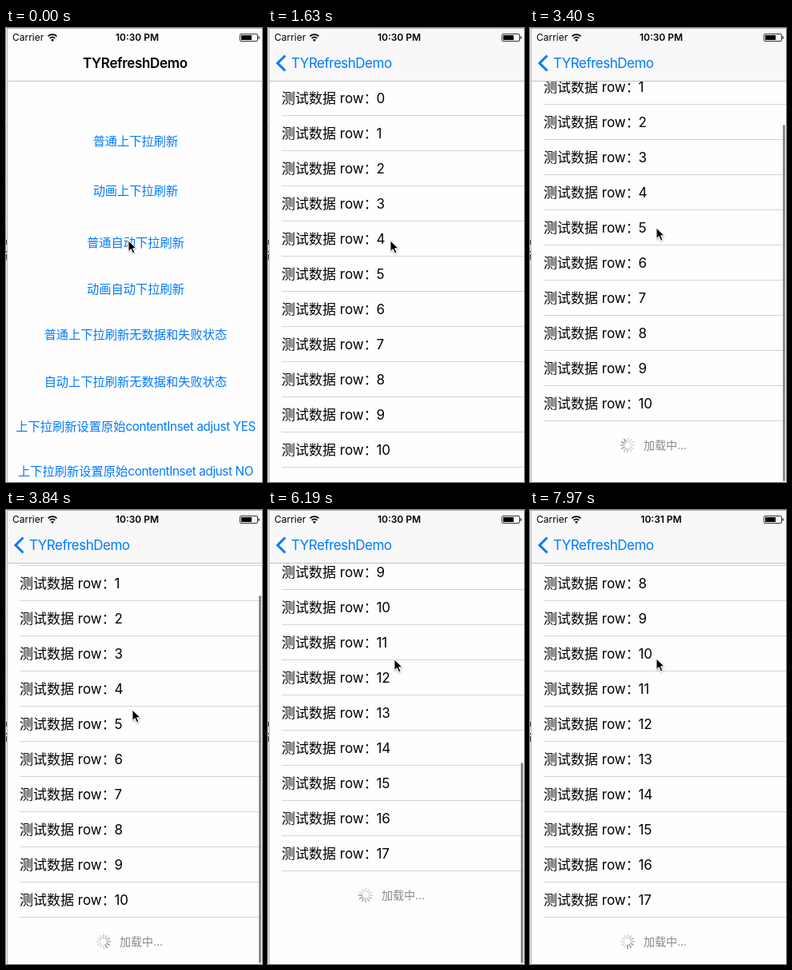
These frames come from a looping animation (320x568 px, 8000 ms). An HTML page:

```html
<!DOCTYPE html>
<html lang="zh-CN">
<head>
<meta charset="utf-8">
<title>TYRefreshDemo</title>
<style>
html, body { margin: 0; width: 100%; height: 100%; overflow: hidden; }
body { position: relative; background: #f4f4f4; font: 17px Inter, "Noto Sans CJK SC", "Noto Sans CJK", sans-serif; white-space: nowrap; }
div, span, svg { position: absolute; }
#phone { left: 2px; top: 0; width: 320px; height: 568px; overflow: hidden; background: #fefefe; }
#home, #page, #dim { top: 0; left: 0; width: 320px; height: 568px; }
#home div { width: 100%; line-height: 30px; font-size: 15.25px; text-align: center; color: #007aff; }
#home i { font-style: normal; letter-spacing: -.38px; }
#dim { background: #000; }
#page { background: #fefefe; overflow: hidden; box-shadow: -1px 0 7px #0002; }
#list { top: 66px; left: 15px; width: 305px; }
.row { width: 305px; height: 43px; line-height: 44px; border-bottom: 1px solid #d4d4d6; }
.row span { left: 118.5px; letter-spacing: -.2px; }
#footer { line-height: 60px; height: 60px; left: 125px; font-size: 14px; color: #888; }
#footer svg { left: -30px; top: 20px; }
#bar { left: 314px; width: 3px; border-radius: 2px; background: #8b8b8b; }
#nav { width: 320px; height: 66px; border-bottom: 1px solid #c2c2c4; }
#nav span { line-height: 20px; }
#title { top: 34px; left: 94px; font-weight: 600; letter-spacing: -.35px; }
#back { top: 34px; left: 27px; color: #007aff; letter-spacing: -.5px; }
#carrier, #clock { top: 2px; font-size: 12px; }
#carrier { left: 6px; }
#clock { left: 102px; width: 120px; text-align: center; font-weight: 600; }
#edge { left: 1px; top: 0; width: 319px; height: 568px; box-sizing: border-box; border: solid #b4b4b4; border-width: 1px 0 0 1px; }
#desk, #cursor { left: 0; top: 0; }
</style>
</head>
<body>
<svg id="desk" width="2" height="568"><path d="M0 124.5h2M0 192.5h2M0 236.5h2" stroke="#bbb"/><path d="M0 265h2v6h-2zM0 279h2v2h-2zM0 283h2v7h-2z" fill="#444"/></svg>
<div id="phone">
  <div id="home"></div>
  <div id="dim"></div>
  <div id="page">
    <div id="list"><div id="footer"><svg id="spinner" width="20" height="20"></svg>加载中...</div></div>
    <div id="bar"></div>
  </div>
  <div id="nav">
    <span id="carrier">Carrier</span>
    <span id="clock"></span>
    <svg width="320" height="24" fill="none" stroke="#000">
      <path d="M50.5 10.3a8.2 8.2 0 0 1 11 0M52.7 12.8a5 5 0 0 1 6.6 0" stroke-width="1.7"/>
      <path d="M56 17l-2-2.2a3 3 0 0 1 4 0z" fill="#000" stroke="none"/>
      <rect x="290.5" y="7.5" width="22" height="9" rx="1.5" stroke-width=".8"/>
      <path d="M292 9h13v6h-13zM313.5 10.500h1.200v3h-1.200z" fill="#000" stroke="none"/>
    </svg>
    <span id="title">TYRefreshDemo</span>
    <svg id="chevron" width="30" height="66"><path d="M19.5 34.5L10 44l9.500 9.500" fill="none" stroke="#007aff" stroke-width="3"/></svg>
    <span id="back">TYRefreshDemo</span>
  </div>
</div>
<div id="edge"></div>
<svg id="cursor" width="16" height="20"><path d="M1 1v13.500l3.200-2.900 2.300 5.200 2.400-1-2.300-5.100h4.400z" stroke="#fff" stroke-width="1" style="filter:drop-shadow(0 1px 1px #0005)"/></svg>
<script>
const LOOP = 8000, STEP = 147.2, ROW = 44, VIEW = 502, TRACK = 498;
const $ = id => document.getElementById(id);
const clamp = v => Math.max(0, Math.min(1, v));

// Piecewise linear value through [time, value] keys
function track(keys, t) {
  const i = keys.findIndex(k => k[0] > t);
  if (i < 0) return keys[keys.length - 1][1];
  if (i === 0) return keys[0][1];
  const [t0, a] = keys[i - 1], [t1, b] = keys[i];
  return a + (b - a) * (t - t0) / (t1 - t0);
}

const cursorX = [[2070, 152], [2516, 157]];
const cursorY = [[2070, 265], [2516, 392], [2664, 392], [2811, 360], [3400, 249], [4000, 249],
  [4750, 397], [5166, 397], [5760, 186], [6900, 186], [7230, 191], [7380, 191], [7830, 185]];
const scrollY = [[2811, 0], [3400, 58], [3547, 50], [3694, 42], [3841, 40], [5166, 40], [5313, 65],
  [5460, 115], [5608, 180], [5755, 250], [5902, 320], [6049, 375], [6196, 406], [6343, 375], [6490, 352], [6638, 348]];
const barAlpha = [[2811, 0], [2950, 1], [3900, 1], [4200, 0], [5166, 0], [5300, 1], [6780, 1], [7080, 0]];

const buttons = [
  [142, "普通上下拉刷新"], [204, "动画上下拉刷新"], [269, "普通自动下拉刷新"], [327, "动画自动下拉刷新"],
  [384, "普通上下拉刷新无数据和失败状态"], [443, "自动上下拉刷新无数据和失败状态"],
  [499, "上下拉刷新设置原始<i>contentInset adjust YES</i>"], [555, "上下拉刷新设置原始<i>contentInset adjust NO</i>"]
];
$("home").innerHTML = buttons.map(([y, s]) => `<div style="top:${y - 15}px">${s}</div>`).join("");
const tapped = $("home").children[2];

const rows = Array.from({ length: 18 }, (_, i) => {
  const row = document.createElement("div");
  row.className = "row";
  row.style.top = i * ROW + "px";
  row.innerHTML = `测试数据 row：<span>${i}</span>`;
  $("list").append(row);
  return row;
});

$("spinner").innerHTML = Array.from({ length: 12 }, (_, i) =>
  `<path d="M10 1.500v4" stroke="#666" stroke-width="1.7" stroke-linecap="round"
    opacity="${0.22 + 0.45 * Math.max(0, (i - 4) / 7)}" transform="rotate(${i * 30} 10 10)"/>`).join("");

function draw(t) {
  // Screen updates land on a coarse clock
  t = 750 + STEP * Math.floor((t - 742) / STEP);

  const y = 0.016 * Math.max(0, t - 1007);
  const push = 1 - (1 + y) * Math.exp(-y);
  $("home").style.transform = `translateX(${-96 * push}px)`;
  $("dim").style.opacity = 0.1 * push;
  $("page").style.transform = `translateX(${Math.round(320 * (1 - push))}px)`;
  $("page").style.visibility = push > 0 ? "visible" : "hidden";
  tapped.style.opacity = t >= 750 ? 0.6 : 1;

  const fade = clamp((push - 0.77) / 0.23);
  $("nav").style.background = push > 0 ? "#f8f8f8" : "#fdfdfd";
  $("title").style.opacity = clamp(1 - push * 1.09);
  $("title").style.transform = `translateX(${-67 * push}px)`;
  $("back").style.opacity = $("chevron").style.opacity = fade;
  $("back").style.transform = `translateX(${67 * (1 - push)}px)`;
  $("clock").textContent = t < 6900 ? "10:30 PM" : "10:31 PM";

  const count = t < 5200 ? 11 : 18;
  const scroll = track(scrollY, t), end = count * ROW - 444;
  rows.forEach((row, i) => row.style.display = i < count ? "" : "none");
  $("list").style.transform = `translateY(${-Math.round(scroll)}px)`;
  $("footer").style.top = count * ROW + "px";
  $("spinner").style.transform = `rotate(${Math.floor(t / 83.34) * 30 - 120}deg)`;

  const size = TRACK * VIEW / (count * ROW + 60) - 0.74 * Math.max(0, scroll - end);
  $("bar").style.height = size + "px";
  $("bar").style.top = 69 + (TRACK - size) * clamp(scroll / end) + "px";
  $("bar").style.opacity = track(barAlpha, t);

  $("cursor").style.transform = `translate(${track(cursorX, t)}px, ${track(cursorY, t)}px)`;
}

const start = performance.now();
function frame() {
  draw((performance.now() - start) % LOOP);
  requestAnimationFrame(frame);
}
frame();
</script>
</body>
</html>
```
